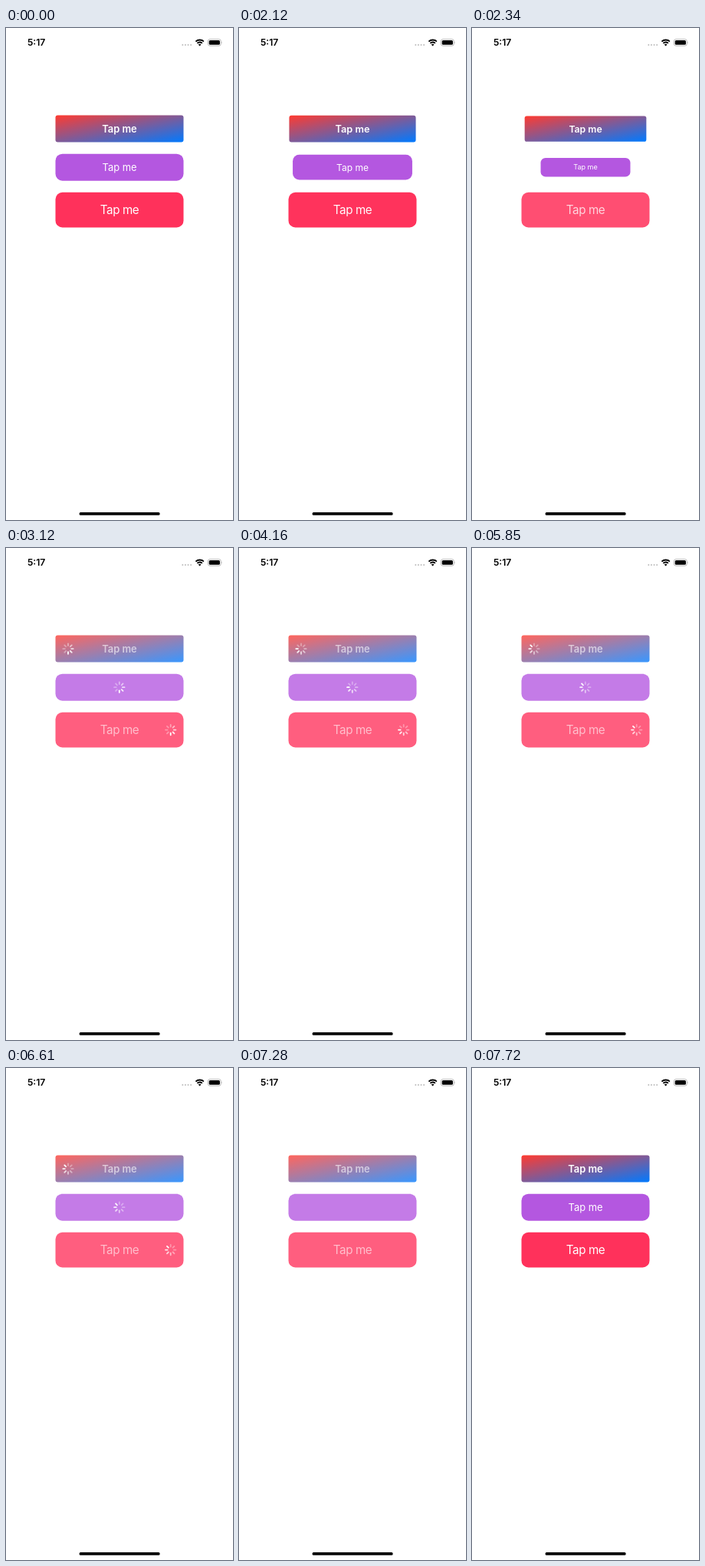
Write an HTML page that moves like this. It is 296 px wide and 640 px high and loops after 7820 ms.

```html
<!DOCTYPE html>
<html lang="en">
<head>
<meta charset="utf-8">
<title>Loading buttons</title>
<style>
  html, body { margin: 0; height: 100%; overflow: hidden; background: #fff; }
  svg { display: block; width: 100%; height: 100%; }
  text { font-family: Inter, "Liberation Sans", sans-serif; text-anchor: middle; }
</style>
</head>
<body>
<svg id="stage" viewBox="0 0 296 640">
  <defs>
    <linearGradient id="blend" x1="0" y1="0" x2="1" y2="1">
      <stop offset="0" stop-color="#ff3b30"/>
      <stop offset="1" stop-color="#007aff"/>
    </linearGradient>
  </defs>
  <text x="39.6" y="23.1" font-size="12.1" font-weight="600">5:17</text>
  <path d="M230.3 22h.01m3.6 0h.01m3.6 0h.01m3.6 0h.01" stroke="#bdbdbd" stroke-width="2" stroke-linecap="round"/>
  <g fill="none" stroke="#000" stroke-width="1.9">
    <path d="M247.4 17.6a7.4 7.4 0 0 1 10.4 0"/>
    <path d="M249.4 19.9a4.5 4.5 0 0 1 6.4 0"/>
  </g>
  <path d="M252.6 23.5l-1.9-1.9a2.7 2.7 0 0 1 3.8 0z"/>
  <rect x="263.3" y="14.6" width="17" height="8.6" rx="2.6" fill="none" stroke="#a8a8a8" stroke-width=".8"/>
  <rect x="264.7" y="16" width="14.2" height="5.8" rx="1.5"/>
  <path d="M281.3 17.4q1.3 1.4 0 2.9z" fill="#a8a8a8"/>
  <rect x="95.5" y="630" width="105.2" height="3.8" rx="1.9"/>
</svg>
<script>
const LOOP = 7820, SPOKES = 8, SPOKE_MS = 100, CX = 148;
const DIM = 0.78, FADED = 0.6;
const stage = document.getElementById('stage');

function add(parent, tag, attrs) {
  const el = document.createElementNS('http://www.w3.org/2000/svg', tag);
  for (const k in attrs) el.setAttribute(k, attrs[k]);
  return parent.appendChild(el);
}

// Eased value from [time, value] keys
function track(t, keys) {
  let [t0, v0] = keys[0];
  for (const [t1, v1] of keys) {
    if (t < t1) {
      const p = Math.max(0, (t - t0) / (t1 - t0));
      return v0 + (v1 - v0) * p * p * (3 - 2 * p);
    }
    [t0, v0] = [t1, v1];
  }
  return v0;
}

const press = low => [[2060, 1], [2260, low], [2360, low], [2560, 1]];
const busy = low => [[2490, 1], [2710, low], [7300, low], [7730, 1]];
const pressDim = (mid, low) =>
  [[2080, 1], [2320, mid], [2400, mid], [2710, low], [7300, low], [7730, 1]];
const spin = [[2620, 0], [2790, 1], [7060, 1], [7230, 0]];

const buttons = [
  { cy: 131.1, h: 35, r: 3, fill: 'url(#blend)', size: 12.9, weight: 600, spinX: 81,
    scale: press(0.95), back: busy(DIM), label: busy(FADED) },
  { cy: 181.2, h: 35, r: 9, fill: '#b457e0', size: 12.9, weight: 400, spinX: 147.8,
    scale: press(0.7), back: busy(DIM), label: busy(0) },
  { cy: 236.6, h: 45.6, r: 9, fill: '#ff315b', size: 15.2, weight: 400, spacing: -0.4, spinX: 214.7,
    scale: press(1), back: pressDim(0.86, DIM), label: pressDim(0.76, FADED) }
];

for (const b of buttons) {
  b.group = add(stage, 'g', {});
  b.rect = add(b.group, 'rect',
    { x: -83.5, y: -b.h / 2, width: 167, height: b.h, rx: b.r, fill: b.fill });
  b.text = add(b.group, 'text', { y: b.size * 0.36, fill: '#fff', 'font-size': b.size,
    'font-weight': b.weight, 'letter-spacing': b.spacing || 0 });
  b.text.textContent = 'Tap me';
  b.spinner = add(b.group, 'g', { transform: `translate(${b.spinX - CX})`,
    stroke: '#fff', 'stroke-width': 1.8, 'stroke-linecap': 'round' });
  b.spokes = Array.from({ length: SPOKES }, (_, i) =>
    add(b.spinner, 'path', { d: 'M0-4.1V-6.7', transform: `rotate(${i * 360 / SPOKES})` }));
}

function draw(t) {
  const head = Math.floor((t - 2700) / SPOKE_MS);
  for (const b of buttons) {
    b.group.setAttribute('transform', `translate(${CX} ${b.cy}) scale(${track(t, b.scale)})`);
    b.rect.setAttribute('opacity', track(t, b.back));
    b.text.setAttribute('opacity', track(t, b.label));
    b.spinner.setAttribute('opacity', track(t, spin));
    b.spokes.forEach((s, i) => {
      const lag = ((head - i) % SPOKES + SPOKES) % SPOKES;
      s.setAttribute('opacity', Math.max(0.35, 1 - lag * 0.14));
    });
  }
}

const start = performance.now();
function tick() {
  draw((performance.now() - start) % LOOP);
  requestAnimationFrame(tick);
}
tick();
</script>
</body>
</html>
```
